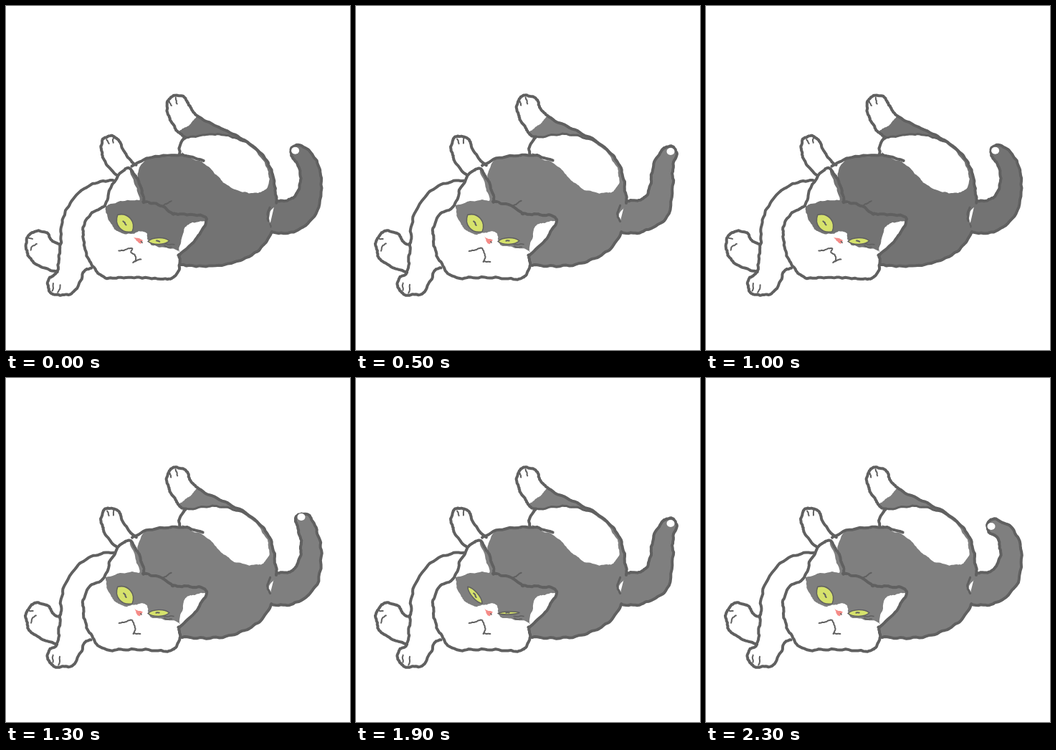
Write an HTML page with a canvas that moves like this. It is 480 px wide and 480 px high and loops after 2.4 s.

```html
<!DOCTYPE html>
<html lang="en">
<head>
<meta charset="utf-8">
<title>Lounging cat</title>
<style>
html, body { margin: 0; width: 100%; height: 100%; overflow: hidden; background: #fff; }
canvas { display: block; }
</style>
</head>
<body>
<canvas id="stage" width="480" height="480"></canvas>
<script>
const ctx = document.getElementById('stage').getContext('2d');
const LINE = '#606060', WHITE = '#fff', GREEN = '#d6e26c', PINK = '#f58c88';
let boil = 0, fur = '';

// Hand-drawn wobble; the two line variants alternate on every step.
function wobble(x, y) {
  const a = boil ? 0.75 : 0.45, f = boil ? 0.33 : 0.5, s = boil * 2.1;
  return [x + a * Math.sin(y * f + s) + 0.3 * Math.sin(x * 1.3 + y),
          y + a * Math.sin(x * f + s + 1) + 0.3 * Math.sin(y * 1.5 - x)];
}

// Smooth curve through flat x,y pairs; doubled points make corners.
function curve(flat, closed) {
  const n = flat.length / 2, path = new Path2D();
  const at = i => {
    const k = closed ? (i + n) % n : Math.max(0, Math.min(n - 1, i));
    return [flat[2 * k], flat[2 * k + 1]];
  };
  for (let i = 0; i < (closed ? n : n - 1); i++) {
    const [a, b, c, d] = [at(i - 1), at(i), at(i + 1), at(i + 2)];
    for (let u = 0; u <= 1; u += 0.125) {
      const mix = j => b[j] + 0.5 * u * (c[j] - a[j] + u * (2 * a[j] - 5 * b[j] + 4 * c[j] - d[j]
        + u * (3 * (b[j] - c[j]) + d[j] - a[j])));
      path.lineTo(...wobble(mix(0), mix(1)));
    }
  }
  if (closed) path.closePath();
  return path;
}

function fill(color, pts) {
  ctx.fillStyle = color;
  ctx.fill(curve(pts, true));
}

function line(pts, width = 4, closed = false) {
  ctx.strokeStyle = LINE;
  ctx.lineWidth = width;
  ctx.stroke(curve(pts, closed));
}

// Tail outlines from curled left to leaning right; the last pair is the white tip.
const tailPoses = [
  [406,261, 411,242, 406,223, 395,214, 392,205, 400,197, 416,202, 432,216, 440,243, 435,285, 398,207],
  [405,263, 411,245, 411,224, 405,203, 406,193, 415,189, 426,196, 435,217, 440,245, 434,287, 412,194],
  [406,264, 413,246, 414,222, 413,198, 418,189, 429,188, 436,202, 440,222, 442,247, 435,287, 424,193],
  [406,264, 411,247, 415,222, 425,204, 434,196, 444,198, 447,208, 442,226, 442,252, 435,293, 439,203]
];
const tailSteps = [0.4, 1, 2, 3, 3, 3, 3, 3, 2, 1, 0.4, 0];
const lidSteps = { 17: 0.8, 18: 0.6, 19: 0.42, 20: 0.2, 21: 0.42, 22: 0.75 };

function drawTail(pose) {
  const i = Math.min(2, Math.floor(pose)), u = pose - i;
  const pts = tailPoses[i].map((v, k) => v + (tailPoses[i + 1][k] - v) * u);
  const [tx, ty] = pts.splice(-2);
  const outline = [376,272, 393,271, ...pts, 412,310, 390,317, 366,315];
  ctx.fillStyle = fur;
  ctx.fill(curve(outline));
  line(outline);
  ctx.fillStyle = WHITE;
  ctx.beginPath();
  ctx.ellipse(tx, ty, 5.5, 5, 0, 0, 7);
  ctx.fill();
}

const leg = [246,181, 238,173, 230,160, 225,146, 226,132, 235,125, 246,126, 253,133,
  258,143, 268,154, 290,166, 320,180];
const back = [345,196, 362,213, 372,235, 376,260, 378,274];
const belly = [371,315, 358,335, 340,349, 310,360, 275,363, 243,361];

function drawBody() {
  fill(fur, [...leg, ...back, 367,292, ...belly, 200,340, 192,268, 184,238, 190,219, 206,211, 243,208, 244,194]);
  fill(WHITE, [246,205, 244,194, 253,185, 285,180, 310,182, 335,192, 352,207, 364,226,
    367,245, 361,257, 345,261, 322,257, 305,247, 292,234, 277,220, 260,213]);
  fill(WHITE, [...leg.slice(2, 20), 266,153, 266,153, 259,163, 249,170, 239,176]);
  line([...leg, ...back]);
  line(belly);
  line([246,181, 255,183, 285,179, 310,181, 335,190], 3);
  line([250,184, 243,193, 242,207]);
  line([176,223, 200,212, 240,208, 260,211, 275,216]);
  line([236,128, 239,136], 2);
  line([228,133, 231,139], 2);
  if (boil) line([369,279, 365,288, 368,301], 3);
  else {
    line([368,281, 365,290, 366,299], 3);
    line([368,304, 370,309], 2);
  }
  line([220,278, 231,272], 2);
}

function drawLimbs() {
  line([156,237, 146,228, 137,215, 133,200, 135,187, 142,182, 151,182, 158,189, 165,203, 174,216, 182,222]);
  line([141,186, 143,192], 2);
  line([150,184, 149,191], 2);
  line([150,243, 125,247, 100,262, 85,283, 77,308, 76,331, 65,328, 58,318, 47,314, 35,317,
    28,330, 31,348, 42,360, 60,368, 72,371]);
  line([76,331, 74,350, 71,372, 60,380, 59,394, 66,402, 78,403, 92,401, 102,388, 110,369, 119,366]);
  line([34,341, 37,335, 43,332], 2);
  line([32,324, 37,325], 2);
  line([66,387, 65,397], 2);
  line([76,389, 73,400], 2);
}

// Almond eye squeezed across its long axis.
function eye(x, y, angle, half, height, open) {
  ctx.save();
  ctx.translate(x, y);
  ctx.rotate(angle);
  const h = height * open * 1.33, w = half * 0.55;
  ctx.beginPath();
  ctx.moveTo(-half, 0);
  ctx.bezierCurveTo(-w, -h, w, -h, half, 0);
  ctx.bezierCurveTo(w, h, -w, h, -half, 0);
  ctx.fillStyle = GREEN;
  ctx.fill();
  ctx.strokeStyle = LINE;
  ctx.lineWidth = 1.5;
  ctx.stroke();
  ctx.restore();
}

function drawHead(open) {
  const head = [138,278, 145,256, 155,239, 165,228, 172,227, 180,236, 188,252, 193,273, 193,273,
    215,278, 233,290, 233,290, 255,291, 275,293, 280,299, 272,315, 261,330, 242,347, 242,347,
    242,364, 236,377, 222,381, 190,379, 160,379, 138,379, 124,367, 113,348, 108,325, 109,305, 120,289];
  fill(WHITE, head);
  fill(fur, [138,279, 138,279, 163,272, 187,271, 187,271, 181,252, 172,228, 180,236, 188,252, 193,273,
    215,278, 233,290, 233,290, 255,291, 278,295, 278,300, 278,300, 258,303, 250,309, 246,322, 241,341,
    241,341, 228,338, 214,336, 203,333, 198,326, 196,318, 188,314, 179,317, 165,318, 153,312, 143,298]);
  line(head, 4, true);

  eye(166, 303, 0.86, 15.5, 10, open);
  eye(213, 328, -0.03, 15, 4.5, open);
  line([164,300, 167,305], 2);
  line([210,328, 214,328], 2);
  line([221,332, 235,333], 1.5);
  line([221,335, 231,337], 1.5);

  fill(PINK, [179,323, 179,323, 190,326, 188,331, 184,330]);
  line([188,328, 190,330], 1.5);
  line(boil
    ? [157,343, 165,340, 174,338, 178,344, 181,350, 178,357, 178,357, 187,356]
    : [157,342, 166,340, 176,338, 174,343, 180,347, 181,354, 178,357, 178,357, 188,353], 2);
}

function draw() {
  const step = Math.floor(performance.now() / 100) % 24;
  boil = step % 2;
  fur = boil ? '#7f7f7f' : '#737373';
  ctx.fillStyle = WHITE;
  ctx.fillRect(0, 0, 480, 480);
  ctx.lineCap = ctx.lineJoin = 'round';
  drawTail(tailSteps[step % 12]);
  drawBody();
  drawLimbs();
  drawHead(lidSteps[step] ?? 1);
  requestAnimationFrame(draw);
}
draw();
</script>
</body>
</html>
```
